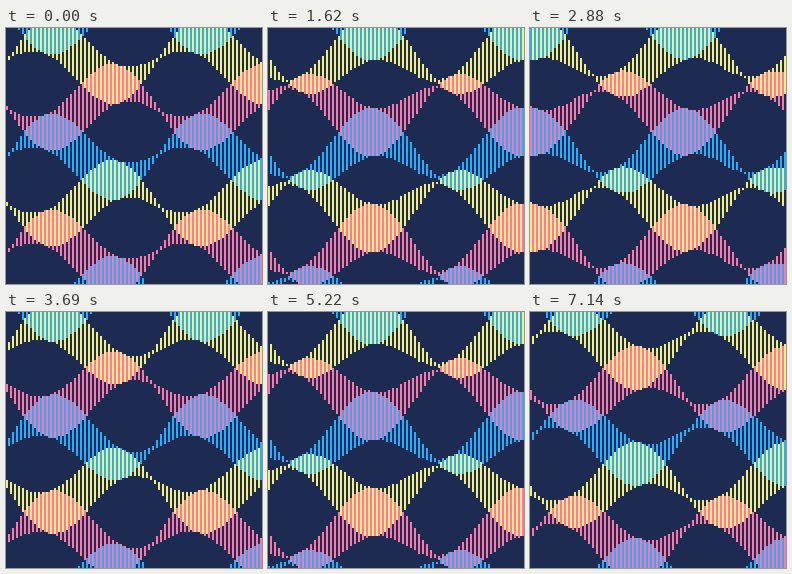
Recreate the animation shown at these times as an HTML page. Size 256 by 256 pixels, loop 7170 ms.

```html
<!DOCTYPE html>
<html lang="en">
<head>
<meta charset="utf-8">
<title>Woven waves</title>
<style>
  html, body { margin: 0; width: 100%; height: 100%; overflow: hidden; background: #1d2b53; }
  svg { display: block; width: 100%; height: 100%; }
</style>
</head>
<body>
<svg id="stage" viewBox="0 0 128 128" shape-rendering="crispEdges"></svg>
<script>
const SIZE = 128;            // coarse pixels, each drawn two stage pixels wide
const STEP_MS = 30;
const LOOP_STEPS = 239;
const CYCLE_STEPS = 120;
const WAVELENGTH = 75;
const ROW_GAP = 24;
const FIRST_ROW_Y = 16;
const SWING = 12;            // height of the centre line's wave
const THICKNESS = 12;        // largest half thickness of a band
const PINCH_X = 1.25;        // where the bands close at the start
const COLORS = ['#f3ef7d', '#ff77a8', '#29adff'];
const TAU = Math.PI * 2;

const stage = document.getElementById('stage');
const rows = [];
for (let index = -1; index <= 5; index++) {
  const path = document.createElementNS('http://www.w3.org/2000/svg', 'path');
  path.setAttribute('fill', COLORS[(index + 3) % 3]);
  stage.append(path);
  rows.push({ index, path, odd: index % 2 !== 0 });
}

// Vertical strokes on every second column; neighbouring rows interleave.
function bandPath({ index, odd }, turn) {
  const y = FIRST_ROW_Y + index * ROW_GAP;
  const side = odd ? 1 : -1;
  let d = '';
  for (let x = odd ? 0 : 1; x < SIZE; x += 2) {
    const centre = y + side * SWING * Math.sin(TAU * (x / WAVELENGTH - turn));
    const half = THICKNESS * Math.abs(Math.sin(TAU * ((x - PINCH_X) / (2 * WAVELENGTH) + turn)));
    const top = Math.floor(centre - half);
    const bottom = Math.floor(centre + half) + 1;
    d += `M${x} ${top}h1V${bottom}h-1z`;
  }
  return d;
}

let shown = -1;
function draw(now) {
  const step = Math.floor(now / STEP_MS) % LOOP_STEPS;
  if (step !== shown) {
    shown = step;
    for (const row of rows) row.path.setAttribute('d', bandPath(row, step / CYCLE_STEPS));
  }
}

const start = performance.now();
function tick() {
  draw(performance.now() - start);
  requestAnimationFrame(tick);
}
tick();
</script>
</body>
</html>
```
